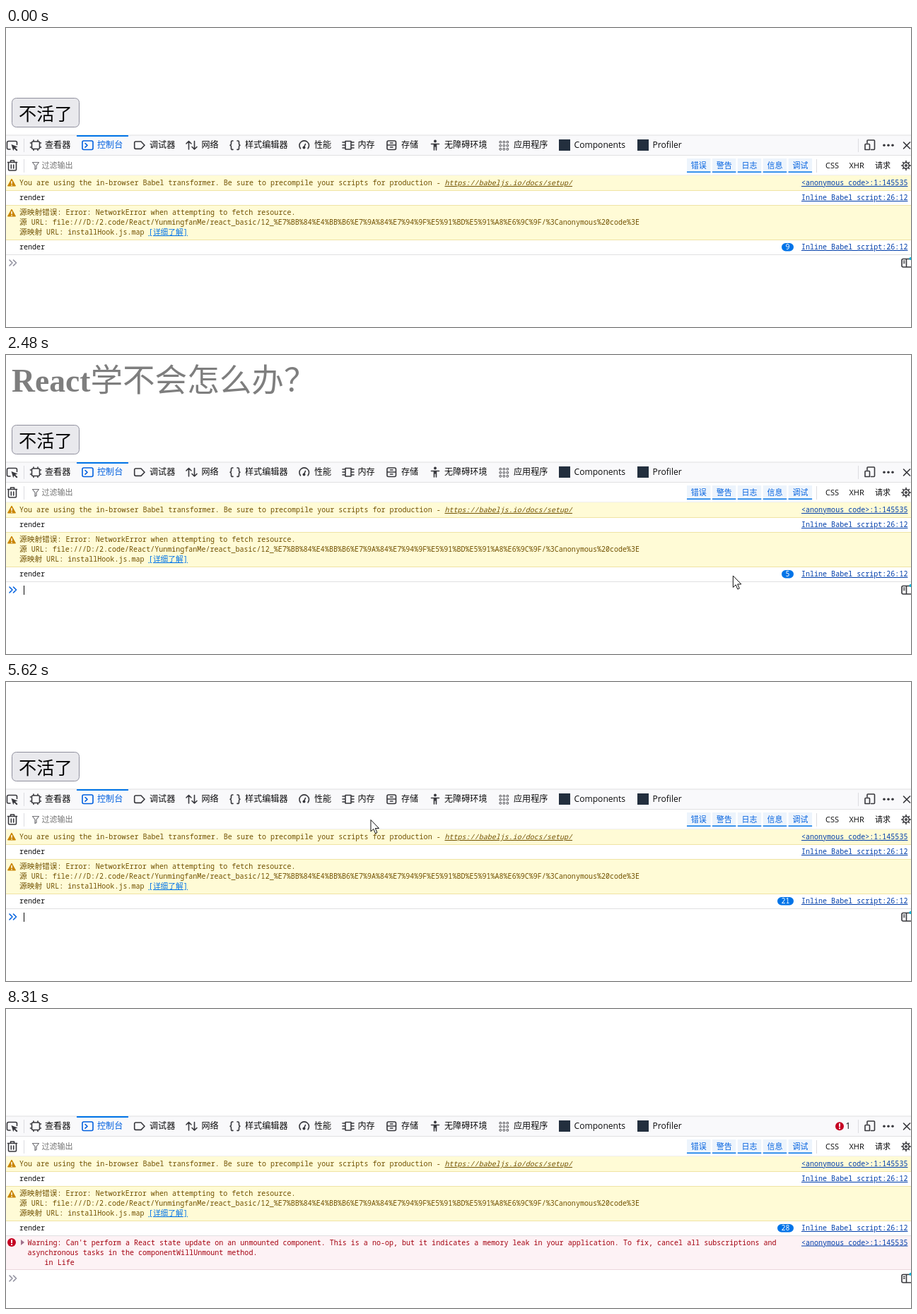
Write an HTML page that moves like this. It is 1280 px wide and 424 px high and loops after 8650 ms.

```html
<!DOCTYPE html>
<html lang="zh-CN">
<head>
<meta charset="utf-8">
<style>
html, body { margin: 0; width: 100%; height: 100%; overflow: hidden; background: #fff; }
svg { display: block; }
text { white-space: pre; }
.ui { font: 12.1px "Open Sans", "Noto Sans CJK SC", sans-serif; fill: #0c0c0d; }
.small { font-size: 11px; }
.heading { font: 700 45.6px "Liberation Serif", serif; }
.heading tspan { font-family: "Noto Sans CJK SC", sans-serif; font-weight: 300; }
.label { font: 25.2px "Noto Sans CJK SC", sans-serif; }
.mono { font: 500 10px "Noto Sans Mono", "Noto Sans CJK SC", monospace; letter-spacing: .017px; fill: #0c0c0d; }
.cjk { font-size: 10.7px; letter-spacing: 0; }
.warn { fill: #715100; }
.err { fill: #a4000f; }
.link { fill: #003eaa; text-decoration: underline; }
.docs { font-style: italic; text-decoration: underline; }
.more { fill: #0074e8; text-decoration: underline; }
.blue { fill: #0060df; }
.icon { fill: none; stroke: #38383d; stroke-width: 1.6; stroke-linejoin: round; stroke-linecap: round; }
</style>
</head>
<body>
<svg id="stage" width="1280" height="424" viewBox="0 0 1280 424"></svg>
<script>
const LOOP = 8650, RELOAD = 1270, START = 1354, TICK = 198, UNMOUNT = 6898, ERROR = 7096;

const text = (x, y, str, cls = 'ui', attrs = '') => `<text x="${x}" y="${y}" class="${cls}" ${attrs}>${str}</text>`;
const mono = (x, y, str, cls = '') => text(x, y, str, 'mono ' + cls);
const rect = (x, y, w, h, fill, attrs = '') => `<rect x="${x}" y="${y}" width="${w}" height="${h}" fill="${fill}" ${attrs}/>`;
const dot = (x, y, r, fill) => `<circle cx="${x}" cy="${y}" r="${r}" fill="${fill}"/>`;
const icon = (d, attrs = '') => `<path class="icon" d="${d}" ${attrs}/>`;
const solid = (d, fill = '#38383d') => `<path d="${d}" fill="${fill}"/>`;
const group = (id, body) => `<g id="${id}">${body}</g>`;
const divider = (x, y) => rect(x, y, 1, 19, '#dcdce0');
const row = (y, h, fill, border) => rect(0, y, 1280, h, fill) + rect(0, y + h - 1, 1280, 1, border);
const warnRow = (y, h) => row(y, h, '#fffbd6', '#efe3a4') +
  `<path d="M8 ${y + 5}l5.5 10h-11z" fill="#c98400" stroke="#c98400" stroke-linejoin="round"/>` +
  solid(`M7.3 ${y + 8}h1.5v4h-1.5zM7.3 ${y + 13}h1.5v1.5h-1.5z`, '#fff');
const alertDot = (x, y) => dot(x, y, 6, '#c50022') +
  solid(`M${x - 1} ${y - 4}h2v5h-2zM${x - 1} ${y + 2}h2v2h-2z`, '#fff');

const page = group('page',
  text(8, 52, 'React<tspan>学不会怎么办？</tspan>', 'heading', 'id="title"') +
  rect(8.5, 99.5, 95, 41, '#e9e9ed', 'id="button" rx="6" stroke="#8f8f9d"') +
  text(18, 131, '不活了', 'label'));

const tabs = [[55, '查看器'], [129, '控制台'], [203, '调试器'], [276.5, '网络'], [338, '样式编辑器'], [436, '性能'],
  [497.5, '内存'], [559, '存储'], [620, '无障碍环境'], [718, '应用程序'], [803.5, 'Components'], [914.5, 'Profiler']];
const filters = ['错误', '警告', '日志', '信息', '调试'];
const grid = Array.from({length: 9}, (_, i) =>
  rect(698 + i % 3 * 5, 160.5 + (i / 3 | 0) * 5, 2.6, 2.6, 'none', 'rx=".8" stroke="#38383d"')).join('');
const teeth = Array.from({length: 8}, (_, i) => icon('M1273 188.6v2', `transform="rotate(${i * 45} 1273 195)"`)).join('');

const tabIcons =
  icon('M6 172H3.5a2 2 0 0 1-2-2v-7.5a2 2 0 0 1 2-2h10a2 2 0 0 1 2 2v3') + solid('M7.5 165l9 3.5-3.5 1.3 3.5 3.2-1.5 1.5-3.3-3.5-1.5 3z') +
  icon('M38 161h8a1.5 1.5 0 0 1 1.5 1.5v7.5a1.5 1.5 0 0 1-1.5 1.5h-8a1.5 1.5 0 0 1-1.5-1.5v-7.5a1.5 1.5 0 0 1 1.5-1.5M39 161v-2M45 161v-2M39 171.5v2M45 171.5v2M36 163h-1.5M36 169h-1.5M48 163h1.5M48 169h1.5') +
  icon('M110 160h11a2 2 0 0 1 2 2v8.5a2 2 0 0 1-2 2h-11a2 2 0 0 1-2-2v-8.5a2 2 0 0 1 2-2M112 163.5l3 2.8-3 2.8', 'style="stroke:#0060df"') +
  icon('M183.5 161h7.5l5 5.2-5 5.2h-7.5a1.8 1.8 0 0 1-1.8-1.8v-6.8a1.8 1.8 0 0 1 1.8-1.8') +
  icon('M258.5 172v-11.5M255 164l3.5-3.5 3.5 3.5M266.5 160.5v11.5M263 168.5l3.5 3.5 3.5-3.5') +
  icon('M321 160h-1q-1.5 0-1.5 2v2q0 2-1.5 2.2 1.5.2 1.5 2.2v2q0 2 1.5 2h1M327 160h1q1.5 0 1.5 2v2q0 2 1.5 2.2-1.5.2-1.5 2.2v2q0 2-1.5 2h-1') +
  icon('M416.5 171a6.8 6.8 0 1 1 10.5 0M421.5 169l2-4.5') + dot(421.5, 169.5, 2, '#38383d') +
  icon('M480 160.5h8v11.5h-8zM477 162h-1M477 166h-1M477 170h-1M491 162h1M491 166h1M491 170h1M480 162h-2.5M480 166h-2.5M480 170h-2.5M488 162h2.5M488 166h2.5M488 170h2.5') +
  icon('M541 160h8.5a2 2 0 0 1 2 2v8.5a2 2 0 0 1-2 2h-8.5a2 2 0 0 1-2-2v-8.5a2 2 0 0 1 2-2M539.5 166h12M543.5 163h3.5M543.5 169h3.5') +
  dot(607, 160.5, 2, '#38383d') + icon('M601.5 164.5h11M607 165v3M605.5 165v8M608.5 165v8') +
  grid + rect(782, 158, 16, 16, '#232f3e') + rect(893, 158, 16, 16, '#232f3e') +
  icon('M1218 163v-3a1 1 0 0 1 1-1h8.5a1 1 0 0 1 1 1v11.5a1 1 0 0 1-1 1h-4M1216 164.5h4.5a1 1 0 0 1 1 1v7h-6.5v-7a1 1 0 0 1 1-1') +
  [1242, 1248, 1254].map(x => dot(x, 166.3, 1.8, '#38383d')).join('') +
  icon('M1269.5 162l9 9M1278.5 162l-9 9');

const toolbar = rect(0, 152, 1280, 29, '#f9f9fb') + rect(0, 151.5, 1280, 1, '#e0e0e2') + rect(0, 180, 1280, 1, '#e0e0e2') +
  rect(100, 152, 73, 2, '#0074e8') + divider(25, 157) + tabIcons +
  tabs.map(([x, label], i) => text(x, 170, label, i === 1 ? 'ui blue' : 'ui')).join('') +
  divider(1205, 157) +
  group('errorCount', alertDot(1179, 166.3) + text(1187.5, 170, '1')) +
  icon('M3.5 191v9.5a1.5 1.5 0 0 0 1.5 1.5h8a1.5 1.5 0 0 0 1.5-1.5v-9.5M2.5 190.5h13M6.5 190v-2h5v2M7.3 194v5M10.7 194v5') +
  divider(25, 186) + icon('M37.5 190.5h9l-3.5 4.5v4.5l-2 1v-5.5z', 'style="stroke:#75757a;stroke-width:1.2"') +
  text(50.5, 199, '过滤输出', 'ui small', 'style="fill:#737373"') +
  filters.map((label, i) => {
    const x = 963 + i * 35.9;
    return rect(x, 185, 33.5, 20, '#edf4fc') + rect(x, 203.5, 33.5, 1.5, '#0074e8') + text(x + 5.8, 199, label, 'ui small blue');
  }).join('') +
  divider(1146, 186) +
  text(1159, 199, 'CSS', 'ui small') + text(1192.5, 199, 'XHR', 'ui small') + text(1229, 199, '请求', 'ui small') +
  '<circle cx="1273" cy="195" r="4.3" class="icon"/><circle cx="1273" cy="195" r="1.3" class="icon"/>' + teeth +
  rect(0, 208.5, 1280, 1, '#e0e0e2');

const scriptLink = y => mono(1125, y, 'Inline Babel script:26:12', 'link');
const codeLink = y => mono(1125, y, '&lt;anonymous code&gt;:1:145535', 'link');
const logs =
  group('firstRows', warnRow(209, 22) +
    mono(19, 223, 'You are using the in-browser Babel transformer. Be sure to precompile your scripts for production - ', 'warn') +
    mono(620.5, 223, 'https://babeljs.io/docs/setup/', 'warn docs') + codeLink(223) +
    row(231, 21, '#fff', '#efe3a4') + mono(19, 244, 'render') + scriptLink(244)) +
  group('mapRow', warnRow(252, 49) +
    mono(19, 265, '源映射错误', 'warn cjk') + mono(72.5, 265, ': Error: NetworkError when attempting to fetch resource.', 'warn') +
    mono(19, 279, '源', 'warn cjk') +
    mono(29.7, 279, ' URL: file:///D:/2.code/React/YunmingfanMe/react_basic/12_%E7%BB%84%E4%BB%B6%E7%9A%84%E7%94%9F%E5%91%BD%E5%91%A8%E6%9C%9F/%3Canonymous%20code%3E', 'warn') +
    mono(19, 293, '源映射', 'warn cjk') + mono(51.1, 293, ' URL: installHook.js.map', 'warn') +
    mono(201.5, 293, '[详细了解]', 'cjk more')) +
  group('lastRow', row(301, 21, '#fff', '#e0e0e2') + mono(19, 314, 'render') + scriptLink(314) +
    group('badge', rect(1091, 305, 23, 11.5, '#0074e8', 'id="pill" rx="5.7"') +
      text(1102.5, 314, '', 'mono', 'id="count" text-anchor="middle" style="fill:#fff"'))) +
  group('errorRow', row(322, 48, '#fdf2f5', '#ecd6dd') + alertDot(8, 331) + solid('M21 327v8l5-4z', '#a0718c') +
    mono(30.5, 334.5, "Warning: Can't perform a React state update on an unmounted component. This is a no-op, but it indicates a memory leak in your application. To fix, cancel all subscriptions and", 'err') +
    mono(30.5, 348.5, 'asynchronous tasks in the componentWillUnmount method.', 'err') + mono(54.6, 362.5, 'in Life', 'err') +
    codeLink(334.5));

const prompt = group('prompt',
  icon('M5 8l4 4-4 4M10.5 8l4 4-4 4', 'id="chevrons"') + rect(25, 6, 1, 13, '#0c0c0d', 'id="caret"') +
  icon('M1282 6.5h-13a2 2 0 0 0-2 2v7.5a2 2 0 0 0 2 2h13M1273.5 7v11M1269.5 9.5h1.5M1269.5 12h1.5') +
  dot(1279.5, 6, 2, '#00b3d8'));

const tooltip = group('tooltip', rect(1109.5, 333.5, 54, 19, '#f9f9fb', 'rx="3" stroke="#5b5b66"') + text(1113, 347, '9 次重复'));
const cursor = '<path id="cursor" d="M0 0v16.5l3.8-3.6 2.7 6.2 2.5-1.1-2.7-6h5.2z" fill="#fff" stroke="#111" stroke-linejoin="round"/>';

stage.innerHTML = page + toolbar + logs + prompt + tooltip + cursor;
const $ = id => document.getElementById(id);
const show = (id, on) => $(id).style.display = on ? '' : 'none';

// Cursor stops: time, x, y
const path = [[0, 1300, 330], [830, 1290, 325], [990, 434, 128], [1100, 380, -25], [1700, 230, -25], [1850, 290, 78],
  [2150, 609, 238], [2480, 1028, 313], [2720, 1110, 313], [5210, 1110, 313], [5850, 185, 130], [5930, 142, 122],
  [6180, 68, 112], [7050, 68, 113], [7400, 200, 140], [7730, 587, 183], [8130, 1100, 375], [8280, 1150, 430], [LOOP, 1150, 430]];

function cursorAt(t) {
  const i = path.findIndex(p => p[0] > t), [t0, x0, y0] = path[i - 1], [t1, x1, y1] = path[i];
  const k = (t - t0) / (t1 - t0);
  return [x0 + (x1 - x0) * k, y0 + (y1 - y0) * k];
}

// The first run is already ten renders in; reloading restarts the count.
const renders = t => t < START ? 10 + Math.floor((t + 30) / 200) : Math.floor((Math.min(t, UNMOUNT + 1) - START) / TICK);

function draw(t) {
  const loaded = t < RELOAD || t >= START, mapped = t < RELOAD || t >= 1440;
  const n = renders(t), logged = t < RELOAD || mapped && n > 0, failed = t >= ERROR;
  // The console badge trails the page slightly
  const lagged = t - 65, count = lagged < START && t >= START ? 0 : renders(lagged);
  const [x, y] = cursorAt(t);

  show('page', loaded && t < UNMOUNT);
  $('title').setAttribute('opacity', 1 - n % 11 / 10);
  const hover = x >= 8 && x <= 104 && y >= 99 && y <= 141;
  $('button').setAttribute('fill', hover ? t > 6810 ? '#b1b1b9' : '#d0d0d7' : '#e9e9ed');

  show('firstRows', loaded);
  show('mapRow', mapped);
  show('lastRow', logged);
  show('errorRow', failed);
  show('errorCount', failed);
  show('badge', count > 1);
  const wide = count > 9;
  $('pill').setAttribute('x', wide ? 1091 : 1097);
  $('pill').setAttribute('width', wide ? 23 : 17);
  $('count').setAttribute('x', wide ? 1102.5 : 1105.5);
  $('count').textContent = count;

  const top = failed ? 370 : logged ? 321 : mapped ? 300 : loaded ? 251 : 209;
  $('prompt').setAttribute('transform', `translate(0 ${top})`);
  const focused = t >= 900 && t < 6810;
  $('chevrons').style.stroke = focused ? '#0060df' : '#8f8f9d';
  show('caret', focused && (t < START || Math.floor((t - 200) / 500) % 2 === 0));

  show('tooltip', t >= 3220 && t < 5250);
  $('cursor').setAttribute('transform', `translate(${x} ${y})`);
}

const begin = performance.now();
function frame() {
  draw((performance.now() - begin) % LOOP);
  requestAnimationFrame(frame);
}
frame();
</script>
</body>
</html>
```
